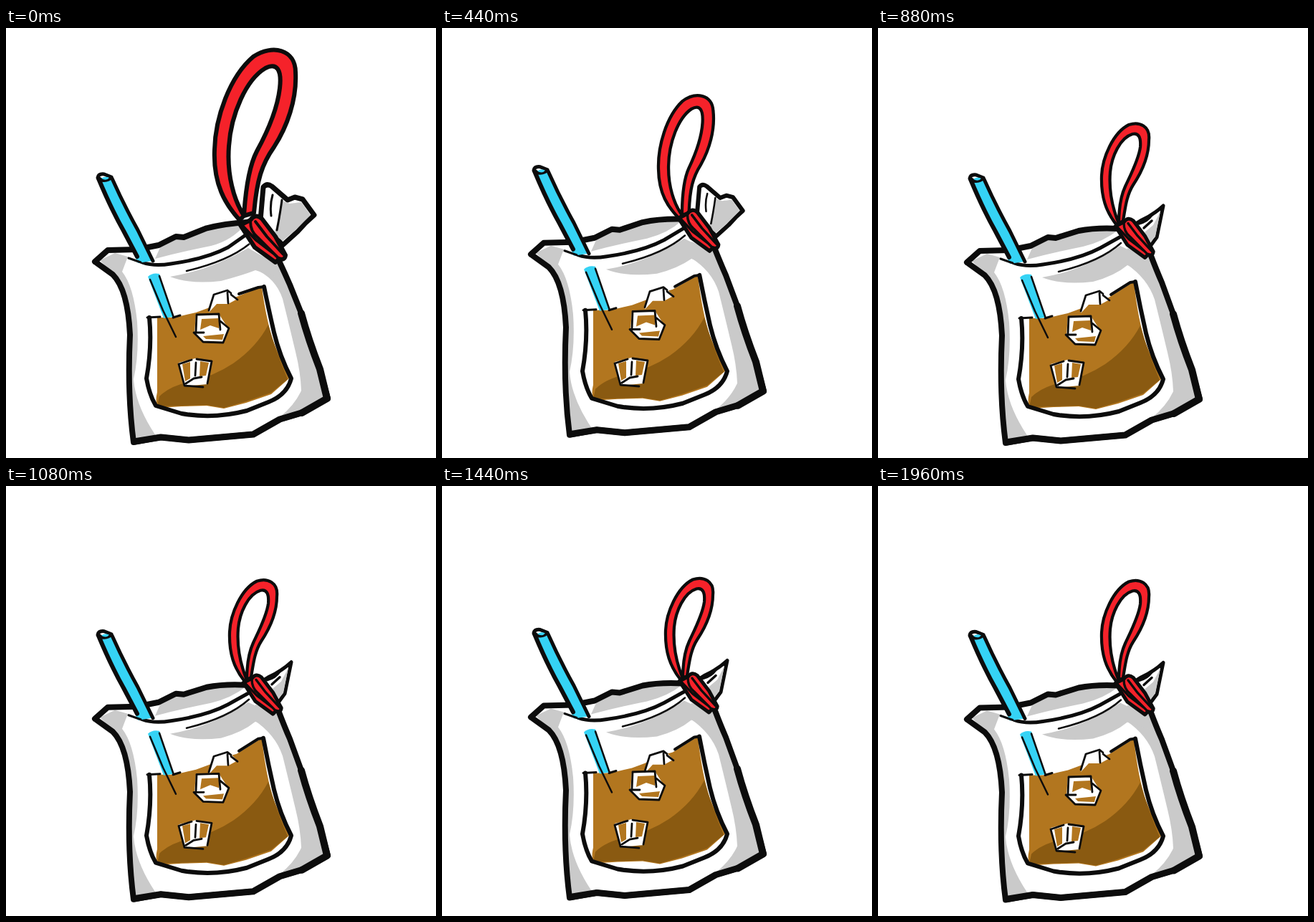
These frames come from a looping animation (600 px wide and 600 px high, 2000 ms). An HTML page:

```html
<!DOCTYPE html>
<html lang="en">
<head>
<meta charset="utf-8">
<title>Iced drink in a bag</title>
<style>
  html, body { margin: 0; width: 100%; height: 100%; overflow: hidden; background: #fff; }
  svg { display: block; width: 100vw; height: 100vh; }
  path { fill: none; stroke-linecap: round; stroke-linejoin: round; }
  .ink { stroke: #0c0c0c; }
  .white { fill: #fff; }
  .gray { fill: #cacaca; }
  .tea { fill: #b2761f; }
  .dark { fill: #8a5a11; }
  .red { fill: #f5222a; }
  .blue { fill: #35d3f5; }
</style>
</head>
<body>
<svg viewBox="0 0 600 600">
  <g id="bag">
    <g id="neckTall">
      <path class="white ink" stroke-width="7" d="M355 268L359 222Q364 216 371 221L393 240L403 236L414 239L430 261L418 272L407 284L386 303Z"/>
      <path class="gray" d="M385 241L396 245L412 243L425 261L404 282L386 297L374 288Q382 262 385 241Z"/>
      <path class="ink" stroke-width="3" d="M372 233Q368 246 370 262M385 240Q382 262 378 282"/>
    </g>
    <g id="neckShort">
      <path class="white ink" stroke-width="5" d="M350 278L366 268Q384 260 398 247L389 291L378 306Z"/>
      <path class="gray" d="M394 255L387 290L378 300L372 284L384 274Z"/>
      <path class="ink" stroke-width="3.5" d="M364 272Q376 269 382 260M371 278L382 268"/>
    </g>

    <path id="body" class="white"/>
    <path class="gray" d="M131 324L152 314L170 319L162 340Q178 360 183 410Q186 455 178 490Q181 530 214 576L179 578Q168 500 174 425Q170 365 150 344Z"/>
    <path id="sideShade" class="gray"/>
    <path id="backShade" class="gray"/>
    <path id="frontShade" class="gray"/>
    <path id="outline" class="ink" stroke-width="8"/>
    <path class="ink" stroke-width="10" d="M412 398Q422 435 438 476L448 517L413 537"/>
    <path class="ink" stroke-width="9" d="M412 537L382 546L345 567L255 575L216 571L179 577"/>
    <path id="rim" class="ink" stroke-width="5"/>
    <path id="crease" class="ink" stroke-width="2.5"/>

    <path class="blue" d="M130 212L147 208L204 325L184 328Z"/>
    <path class="ink" stroke-width="6" d="M129 210Q147 253 164 283L183 319"/>
    <path class="ink" stroke-width="5" d="M148 210Q165 248 184 282L205 325"/>
    <path class="ink" fill="#0c0c0c" stroke-width="5" d="M128 209Q129 203 137 204L147 208Q142 214 133 212Z"/>
    <path class="blue" d="M133 210Q138 206 144 209Q140 214 133 210Z"/>
    <path class="ink" stroke-width="3" d="M171 321L188 327"/>

    <path id="tea" class="tea"/>
    <path class="dark" d="M366 414Q350 445 317 468Q290 486 255 494Q228 500 214 514L211 528L245 527L280 526L304 530L335 521L370 509L393 490Q376 450 366 414Z"/>
    <path id="frame" class="ink" stroke-width="6"/>
    <path id="surface" class="ink" stroke-width="4"/>
    <path class="ink" stroke-width="3" d="M197 404L215 403M233 404L243 401"/>
    <path class="blue" d="M198 347Q204 341 214 343L233 403L220 405Z"/>
    <path class="ink" stroke-width="2.5" d="M201 351L219 394L237 431M214 346L234 404"/>
  </g>

  <g class="cube">
    <path class="white" d="M283 397L290 372L311 366L323 378L310 385L294 385Z"/>
    <path class="ink" stroke-width="2.8" d="M283 394L290 372L309 366L314 370M309 369L310 384M314 372L323 379"/>
  </g>
  <g class="cube">
    <path class="white" d="M265 400L297 399L310 419L303 439L275 438L263 425Z"/>
    <path class="tea" d="M273 406L297 405L297 419L285 415L271 421ZM275 430L304 427L302 435L279 434Z"/>
    <path class="ink" stroke-width="2.8" d="M265 424L266 400L297 399L299 421M299 409L311 419L303 439L275 438L262 425L276 425"/>
  </g>
  <g class="cube">
    <path class="white" d="M241 467L264 461L287 465L281 497L249 500Z"/>
    <path class="tea" d="M246 469L257 466L257 489L250 493ZM271 465L283 467L279 485L270 486Z"/>
    <path class="ink" stroke-width="2.8" d="M259 463L241 469L249 499L275 501M266 462L287 465L281 496M265 467L264 485M251 496L262 489L273 487"/>
  </g>

  <g id="tie">
    <g id="loopLong">
      <path class="red ink" fill-rule="evenodd" stroke-width="6" d="M326 268C306 246 289 218 291 170C292 125 312 68 345 40C372 22 404 30 404 62C406 100 392 138 374 166C357 190 350 212 346 258L332 262C334 230 338 195 350 172C362 150 378 118 382 84C385 58 378 48 362 56C335 72 314 120 311 165C308 205 318 240 332 262Z"/>
    </g>
    <g id="loopShort">
      <path class="red ink" fill-rule="evenodd" stroke-width="4.2" d="M333 274C318 255 311 235 312 205C313 180 328 145 350 134C365 129 380 136 378 155C378 178 368 200 356 218C347 232 345 250 342 268L336 272C336 255 338 235 345 220C352 205 364 182 366 165C367 152 364 145 355 147C338 152 326 178 324 200C322 225 327 250 336 272Z"/>
    </g>
    <g id="knot">
      <path class="red ink" stroke-width="6" d="M327 275L341 268Q348 258 357 266L376 291L390 317Q389 325 381 322L376 327L347 306Z"/>
      <path class="ink" stroke-width="4" d="M341 270Q341 284 351 292L380 321M348 270L364 291L387 316M331 277L349 296L375 316"/>
    </g>
  </g>
</svg>
<script>
const LOOP = 2000, STEP = 40, RELEASE = 600, SWAP = 520;
const TIMES = [0, 280, 600, 880, 1280, 1640, 1960];
const BOB = [0, -8.5, -11, 1, -3.5, -3.5, -0.5];
const CUBE_BOB = [
  [0, -5, -3, 1, 8, -2, 2],
  [0, 0, -9, 3, 1, -3, 6],
  [0, 2, -4, 2, 7, 0, 10]
];

const $ = id => document.getElementById(id);
const cubes = [...document.querySelectorAll('.cube')];
const mix = (a, b, k) => a + (b - a) * k;
const setPath = (id, d) => $(id).setAttribute('d', d);
const move = (el, value) => el.setAttribute('transform', value);
const show = (id, on) => { $(id).style.display = on ? '' : 'none'; };

const slope = (v, i) => (v[i + 1] - v[i]) / (TIMES[i + 1] - TIMES[i]);

// Flat at turning points, so a part never overshoots its poses
function tangent(v, i) {
  if (i === 0 || i === v.length - 1) return 0;
  const p = slope(v, i - 1), q = slope(v, i);
  return p * q > 0 ? 2 * p * q / (p + q) : 0;
}

function curve(v, t) {
  const last = TIMES.length - 1;
  if (t >= TIMES[last]) return v[last];
  const i = TIMES.findIndex((_, n) => t < TIMES[n + 1]);
  const span = TIMES[i + 1] - TIMES[i], u = (t - TIMES[i]) / span;
  const ease = u * u * (3 - 2 * u);
  return mix(v[i], v[i + 1], ease)
    + span * u * (1 - u) * ((1 - u) * tangent(v, i) - u * tangent(v, i + 1));
}

function shapeBag(pull) {
  const low = 8 * pull, rise = 8 * pull;
  const back = `M124 326L142 310L183 309L213 303L237 291L248 292L280 ${282 - rise / 3}Q305 ${277 - rise / 2} 337 ${279 - rise}`;
  const side = `L381 ${317 + low}Q389 ${338 + low / 2} 396 ${354 + low / 2}L412 398Q422 435 438 476L449 517`;
  const base = 'L413 537L382 546L345 567L255 575L216 571L178 578Q169 510 173 428Q170 365 149 344Z';
  setPath('body', back + side + base);
  setPath('outline', back + `M381 ${317 + low}` + side + base.replace('Z', 'L124 326'));
  setPath('sideShade', `M348 ${306 + low}L380 ${320 + low}L396 ${354 + low / 2}L412 398Q422 435 438 476L447 514L412 534L382 543Q403 526 412 506Q411 480 404 452Q394 410 386 378Q376 348 346 ${328 + low}Z`);
  setPath('backShade', `M208 322L216 304L240 293L280 ${283 - rise / 3}L335 ${281 - rise}Q315 297 286 304Q246 312 208 322Z`);
  setPath('frontShade', `M229 347Q285 338 338 ${303 + low / 2}L378 ${322 + low}L383 ${341 + low}L348 ${330 + low}Q330 345 300 353Q256 358 229 347Z`);
  setPath('rim', `M190 327Q207 333 230 329Q280 322 310 306L337 ${291 - rise / 2}`);
  setPath('crease', `M252 339Q310 325 339 ${299 + low / 3}`);
  const corner = 353 + low;
  setPath('tea', `M211 404L235 404L265 397L284 390L300 381L322 375L357 ${corner}Q363 408 374 440L395 489L370 511L335 523L304 531L280 527L245 528L214 530Q207 525 211 508Z`);
  setPath('frame', `M200 404Q204 445 196 489Q200 512 209 527L245 538Q290 546 336 534L366 522Q392 512 398 489Q382 458 374 425Q366 390 ${359 + pull} ${corner}`);
  setPath('surface', `M${359 + pull} ${corner}L352 ${corner + 1}L325 371`);
}

function draw(t) {
  const stretched = t < SWAP;
  const pull = stretched ? 1 - t / RELEASE : 0;
  const bob = curve(BOB, t);
  const lean = -4.2 * Math.sin(Math.PI * pull);
  const shift = `translate(0 ${bob})`;
  shapeBag(pull);
  move($('bag'), shift);
  move($('tie'), shift);
  move($('loopLong'), `translate(${mix(338, 335, pull)} ${mix(278, 268, pull)}) rotate(${lean}) scale(${mix(0.61, 1, pull)}) translate(-335 -268)`);
  move($('knot'), `translate(${mix(338, 335, pull)} ${mix(269, 267, pull)}) scale(${mix(0.84, 1, pull)}) translate(-335 -267)`);
  move($('neckTall'), `translate(360 290) scale(${mix(0.8, 1, pull)}) translate(-360 -290)`);
  show('neckTall', stretched);
  show('loopLong', stretched);
  show('neckShort', !stretched);
  show('loopShort', !stretched);
  cubes.forEach((cube, i) => move(cube, `translate(0 ${curve(CUBE_BOB[i], t)})`));
}

const start = performance.now();
function tick() {
  const t = (performance.now() - start) % LOOP;
  draw(Math.floor(t / STEP) * STEP);
  requestAnimationFrame(tick);
}
tick();
</script>
</body>
</html>
```
